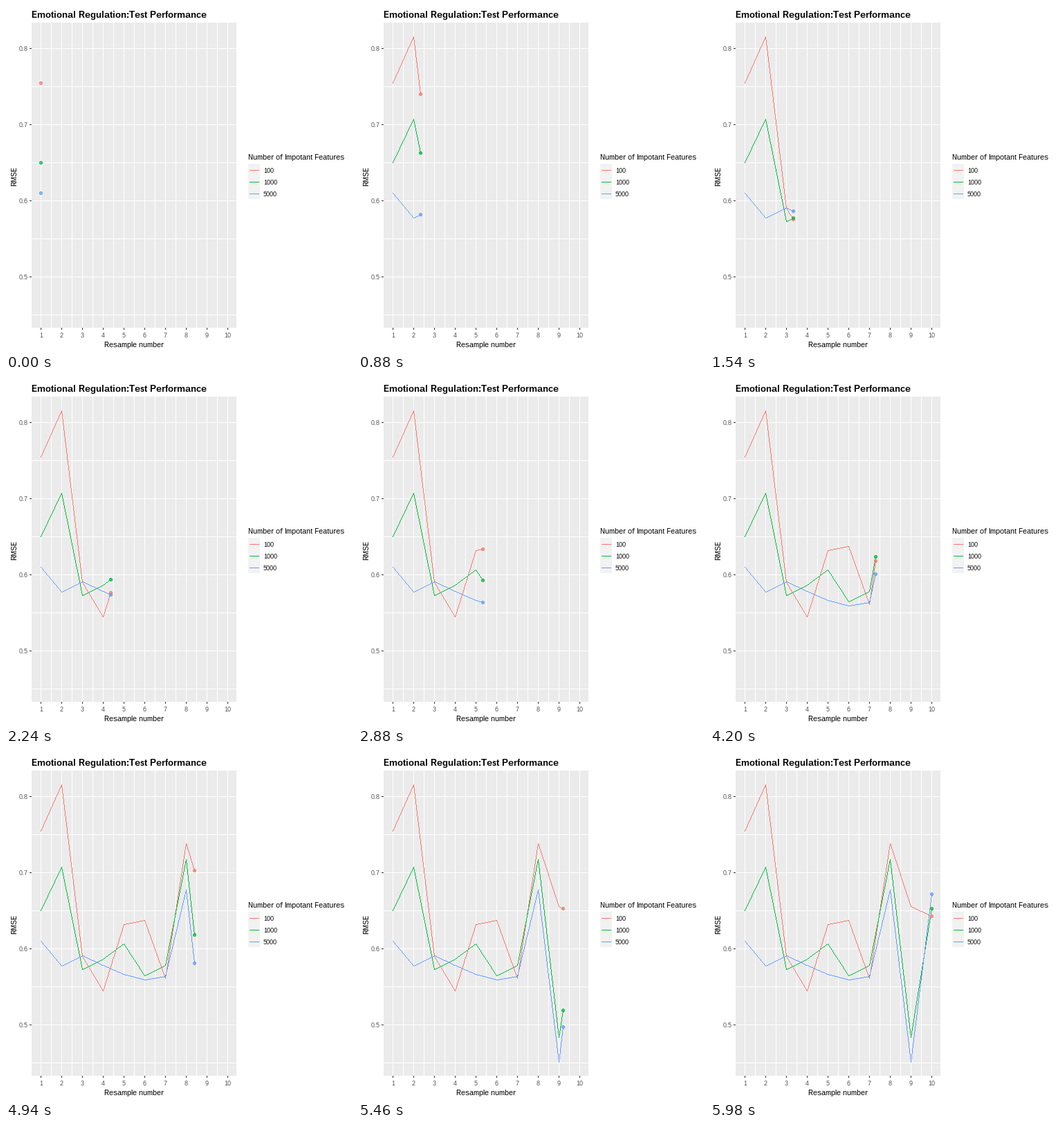
A matplotlib script that plays this animation: 500 by 500 pixels, repeating every 8 s.

```python
import numpy as np
import matplotlib.pyplot as plt
from matplotlib.animation import FuncAnimation
from matplotlib.colors import to_rgb

SIZE, DPI = 500, 100
FRAMES, MOVING, INTERVAL = 400, 300, 20
LEFT, RIGHT, TOP, BOTTOM = 37, 332, 24, 464

SERIES = {
    "100": ("#F8766D", [.7545, .8155, .5900, .5450, .6320,
                        .6375, .5605, .7380, .6555, .6425]),
    "1000": ("#00BA38", [.6500, .7075, .5730, .5860, .6065,
                         .5650, .5785, .7175, .4835, .6525]),
    "5000": ("#619CFF", [.6100, .5770, .5905, .5780, .5665,
                         .5590, .5640, .6770, .4505, .6718]),
}

# each resample is reached on a whole frame
resample = np.arange(1, 11)
key_frames = np.round((resample - 1) * (MOVING - 1) / 9)


def whole(v):
    return np.floor(np.asarray(v) + .5).astype(int)


def px_x(v):
    return whole(50.07 + 29.95 * (np.asarray(v) - 1))


def px_y(v):
    return whole(61 + 1100 * (0.8 - np.asarray(v)))


def rgb(color):
    return np.round(np.array(to_rgb(color)) * 255)


def fill(img, x0, y0, x1, y1, color):
    img[y0:y1 + 1, x0:x1 + 1] = rgb(color)


def polyline(img, xs, ys, color):
    """One pixel wide line without smoothing."""
    for x0, y0, x1, y1 in zip(xs, ys, xs[1:], ys[1:]):
        n = max(abs(x1 - x0), abs(y1 - y0)) + 1
        img[whole(np.linspace(y0, y1, n)),
            whole(np.linspace(x0, x1, n))] = rgb(color)


# translucent disc whose rim is painted twice
dy, dx = np.mgrid[-2:3, -2:3]
dist = dx ** 2 + dy ** 2
DISC = np.select([dist <= 2, dist <= 5], [.7, .91], 0)[..., None]


def dot(img, x, y, color):
    part = img[y - 2:y + 3, x - 2:x + 3]
    part[:] = np.round(part * (1 - DISC) + rgb(color) * DISC)


# hinted type with whole-pixel advances
plt.rcParams.update({"font.family": "Liberation Sans",
                     "text.hinting": "native", "text.hinting_factor": 1})
fig = plt.figure(figsize=(SIZE / DPI, SIZE / DPI), dpi=DPI, facecolor="white")


def label(x, y, text, size, color="black", **kw):
    fig.text(x / SIZE, 1 - y / SIZE, text, fontsize=size * 72 / DPI,
             color=color, va="baseline", **kw)


# panel, grid and ticks
back = np.full((SIZE, SIZE, 3), 255, np.uint8)
fill(back, LEFT, TOP, RIGHT, BOTTOM, "#EBEBEB")
for x in px_x(np.arange(1, 10.1, .5)):
    fill(back, x, TOP, x, BOTTOM, "white")
for y in px_y(np.arange(.45, .81, .05)):
    fill(back, LEFT, y, RIGHT, y, "white")

for n in resample:
    x = px_x(n)
    fill(back, x, BOTTOM + 1, x, BOTTOM + 3, "#333333")
    label(x + .5, 479, str(n), 9, "#4D4D4D", ha="center")
for v in (.5, .6, .7, .8):
    y = px_y(v)
    fill(back, LEFT - 3, y, LEFT - 1, y, "#333333")
    label(32, y + 4, f"{v:.1f}", 9, "#4D4D4D", ha="right")

label(37, 17, "Emotional Regulation:Test Performance", 13, fontweight="bold")
label(185, 493, "Resample number", 11, ha="center")
label(15, 246.5, "RMSE", 11, rotation=90, rotation_mode="anchor", ha="center")

# legend
label(350, 222, "Number of Impotant Features", 11)
fill(back, 350, 228, 366, 278, "#F2F2F2")
for i, (name, (color, _)) in enumerate(SERIES.items()):
    y = 237 + 17 * i
    fill(back, 352, y, 365, y, color)
    label(372, y + 4, name, 9)

stage = fig.figimage(back, origin="upper")


def update(frame):
    f = min(frame, MOVING - 1)
    now = np.interp(f, key_frames, resample)
    seen = key_frames < f
    xs = px_x(np.append(resample[seen], now))
    img = back.copy()
    tips = []
    for color, values in SERIES.values():
        tip = np.interp(now, resample, values)
        ys = px_y(np.append(np.array(values)[seen], tip))
        polyline(img, xs, ys, color)
        tips.append((xs[-1], ys[-1], color))
    for tip in tips:
        dot(img, *tip)
    stage.set_data(img)
    return [stage]


anim = FuncAnimation(fig, update, frames=FRAMES, interval=INTERVAL,
                     repeat=True, repeat_delay=0)
plt.show()
```
